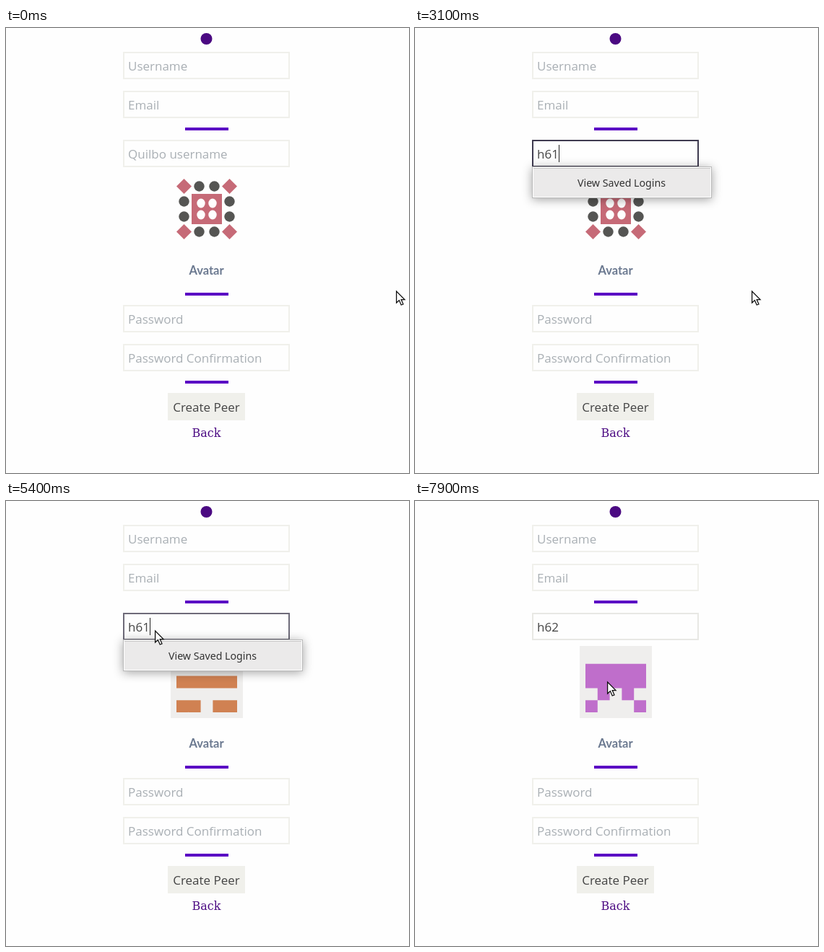
Animation of 558 by 617 pixels, one loop 8000 ms. Source, as an HTML page:

```html
<!DOCTYPE html>
<html lang="en">
<head>
<meta charset="utf-8">
<style>
  html, body { margin: 0; width: 100%; height: 100%; overflow: hidden; background: #fefefe; }
  svg { display: block; width: 558px; height: 617px; }
  text { white-space: pre; }
  .form { font: 17px "Open Sans", sans-serif; fill: #444; }
  .hint { fill: #a9afb4; }
  .menu { font: 14.2px "Noto Sans", sans-serif; fill: #333; }
  .note { fill: #888785; }
  .mid { text-anchor: middle; }
  .field { fill: #fefefe; stroke: #f0f0eb; stroke-width: 2; }
  #dropdown { filter: drop-shadow(0 2px 7px rgba(0, 0, 0, .36)); }
</style>
</head>
<body>
<svg id="stage" viewBox="0 0 558 617">
  <circle cx="277.5" cy="15" r="8" fill="#4b0a82"/>
  <g id="form"></g>
  <text id="typed" class="form" x="169" y="181"></text>
  <path id="caret" stroke="#222"/>
  <g id="avatars"></g>
  <text class="mid" x="277.5" y="342" fill="#6b7990" style="font: 700 16.5px Lato, sans-serif">Avatar</text>
  <rect x="224" y="506" width="107" height="38" fill="#f0f0eb"/>
  <text class="form mid" x="277.5" y="532">Create Peer</text>
  <text class="mid" x="277.5" y="567" fill="#4b0a82" style="font: 16px 'DejaVu Serif', serif">Back</text>
  <g id="dropdown">
    <rect id="panel" x="162.5" y="192.5" width="248" fill="#fff" stroke="#b9b9b9"/>
    <g id="rows"></g>
    <g id="footer">
      <rect x="164" y="195" width="245" height="39" fill="#ebeaea"/>
      <path d="M164 194.5H409" stroke="#c6c5c5"/>
      <text class="menu mid" x="286" y="220">View Saved Logins</text>
    </g>
  </g>
  <path id="pointer" d="M.6 1V17L4.4 13.6L7.2 20L10 18.8L7.2 12.6H12Z" fill="#fff" stroke="#111" stroke-width="1.3"/>
</svg>
<script>
const LOOP = 8000, STEP = 100;
const $ = id => document.getElementById(id);

// Static form
const fields = [[33, 'Username'], [87, 'Email'], [155, 'Quilbo username'],
  [384, 'Password'], [438, 'Password Confirmation']];
$('form').innerHTML = fields.map(([y, label]) =>
  `<rect class="field" x="163" y="${y + 1}" width="229" height="36"/>
   <text class="form hint" x="169" y="${y + 26}">${label}</text>`).join('') +
  [138, 367, 489].map(y => `<rect x="248" y="${y}" width="60" height="4" fill="#5a00c4"/>`).join('');
const boxes = document.querySelectorAll('.field');
const hint = document.querySelectorAll('.hint')[2];

// Avatars
const pixelAvatar = (color, bitmap) => {
  const cell = 16.8;
  let path = '';
  bitmap.forEach((row, j) => [...row].forEach((bit, i) => {
    if (bit === '#') path += `M${236 + i * cell} ${209 + j * cell}h${cell}v${cell}h${-cell}z`;
  }));
  return `<g><rect x="228" y="201" width="100" height="100" fill="#efeeed"/><path d="${path}" fill="${color}"/></g>`;
};
const tileAvatar = () => {
  let out = '<rect x="257" y="230" width="42" height="42" fill="#c66a77"/>';
  for (let j = 0; j < 4; j++) for (let i = 0; i < 4; i++) {
    const x = 246.5 + 21 * i, y = 219.5 + 21 * j;
    const edgeX = i % 3 === 0, edgeY = j % 3 === 0;
    if (edgeX && edgeY) out += `<path d="M${x} ${y - 10.5}l10.5 10.5l-10.5 10.5l-10.5 -10.5z" fill="#c66a77"/>`;
    else if (edgeX || edgeY) out += `<circle cx="${x}" cy="${y}" r="7.2" fill="#555553"/>`;
    else out += `<ellipse cx="${238 + 16 * (i + 1)}" cy="${227 + 16 * j}" rx="5.7" ry="6.5" fill="#fefefe"/>`;
  }
  return `<g>${out}</g>`;
};
$('avatars').innerHTML = tileAvatar() +
  pixelAvatar('#d08152', ['#####', '.....', '#####', '.....', '##.##']) +
  pixelAvatar('#bf6ecb', ['.....', '#####', '#####', '.#.#.', '#...#']);
const avatars = [...$('avatars').children];

// Saved logins
const logins = ['clerk', 'hrOlt@ov.zzz', 'registrar', 'rrv@olo.zzz', 'DEMO', 'peer', 'ob@ov.zz', 'obrenit'];
const loginRow = (name, i, lit) => `<g transform="translate(0 ${194 + 44 * i})">
  ${lit ? '<rect x="164" width="245" height="44" fill="#ebeaea"/>' : ''}
  <path d="M169 12H178M170.5 12v3.5M174.5 12v3" stroke="#8d8680" stroke-width="2" fill="none"/>
  <circle cx="181" cy="12" r="3" stroke="#8d8680" stroke-width="2" fill="none"/>
  <text class="menu" x="189" y="18">${name}</text>
  <text class="menu note" x="189" y="37">From this website</text></g>`;

// Timelines: [time, value], each value holds until the next
const typing = [[0, ''], [2000, 'h'], [2300, 'h6'], [2600, 'h61'], [5900, 'h6'], [6100, 'h62']];
const filters = [[0, null], [1100, ''], [2100, 'h'], [2400, 'h6'], [3500, null], [5300, 'h6'], [6500, null]];
const avatarShown = [[0, 0], [3600, -1], [4100, 1], [6600, -1], [7400, 2]];
const caretStart = [[0, null], [1000, 1000], [2000, 2000], [2300, 2300], [2600, 2600], [3900, null],
  [5200, 5200], [5900, 5900], [6100, 6100], [7160, null]];
const pointerPath = [[100, 540, 364], [500, 480, 270], [800, 370, 148], [900, 360, 140], [1100, 356, 193],
  [1400, 398, 270], [1700, 440, 345], [1900, 451, 360], [3000, 451, 360], [3100, 466, 364],
  [3300, 472, 405], [3500, 476, 452], [3900, 476, 452], [4300, 352, 341], [4700, 240, 239],
  [5200, 206, 182], [5400, 206, 179], [6200, 206, 179], [6700, 202, 349], [7000, 200, 374],
  [7250, 205, 400], [7400, 215, 396], [7900, 266, 250]];

const held = (track, t) => track.filter(([start]) => start <= t).pop()[1];
const clamp = v => Math.max(0, Math.min(1, v));

function along(path, t) {
  const k = path.findIndex(([time]) => time > t);
  if (k < 0) return path[path.length - 1].slice(1);
  if (k === 0) return path[0].slice(1);
  const [a, b] = [path[k - 1], path[k]];
  const p = (t - a[0]) / (b[0] - a[0]);
  return [1, 2].map(i => a[i] + (b[i] - a[i]) * p);
}

// CSS "ease": cubic-bezier(.25, .1, .25, 1)
function ease(p) {
  let lo = 0, hi = 1, s;
  for (let i = 0; i < 16; i++) {
    s = (lo + hi) / 2;
    const x = .75 * s * (1 - s) * (1 - s) + .75 * s * s * (1 - s) + s ** 3;
    if (x < p) lo = s; else hi = s;
  }
  return .3 * s * (1 - s) * (1 - s) + 3 * s * s * (1 - s) + s ** 3;
}
const faded = (t, start) => ease(clamp((t - start) / 1000));
const borderColor = p => {
  const mix = (a, b) => Math.round(a + (b - a) * p);
  return `rgb(${mix(240, 63)},${mix(240, 59)},${mix(235, 80)})`;
};

let shownFilter;
function drawDropdown(filter) {
  if (filter === shownFilter) return;
  shownFilter = filter;
  $('dropdown').style.display = filter === null ? 'none' : '';
  if (filter === null) return;
  const matches = logins.filter(name => name.startsWith(filter));
  $('rows').innerHTML = matches.map((name, i) => loginRow(name, i, !filter && i === 0)).join('');
  $('panel').setAttribute('height', 43 + 44 * matches.length);
  $('footer').setAttribute('transform', `translate(0 ${44 * matches.length})`);
}

function draw(t) {
  const text = held(typing, t);
  $('typed').textContent = text;
  hint.style.display = text ? 'none' : '';

  const blink = held(caretStart, t);
  const caretX = Math.round(169 + (text ? $('typed').getComputedTextLength() : 0)) + .5;
  $('caret').setAttribute('d', `M${caretX} 162V186`);
  $('caret').style.display = blink !== null && (t - blink) % 1200 < 600 ? '' : 'none';

  const focus = faded(t, 780) - faded(t, 3900) + faded(t, 4960) - faded(t, 7160);
  boxes[2].style.stroke = borderColor(focus);
  const hover = .2 * Math.min(clamp((t - 7150) / 250), clamp((7800 - t) / 400));
  boxes[3].style.stroke = borderColor(hover);

  const shown = held(avatarShown, t);
  avatars.forEach((avatar, i) => avatar.style.display = i === shown ? '' : 'none');
  drawDropdown(held(filters, t));

  const [x, y] = along(pointerPath, t).map(Math.round);
  $('pointer').setAttribute('transform', `translate(${x} ${y})`);
}

const origin = performance.now();
function tick() {
  const t = (performance.now() - origin) % LOOP;
  draw(Math.floor(t / STEP) * STEP);
  requestAnimationFrame(tick);
}
tick();
</script>
</body>
</html>
```
